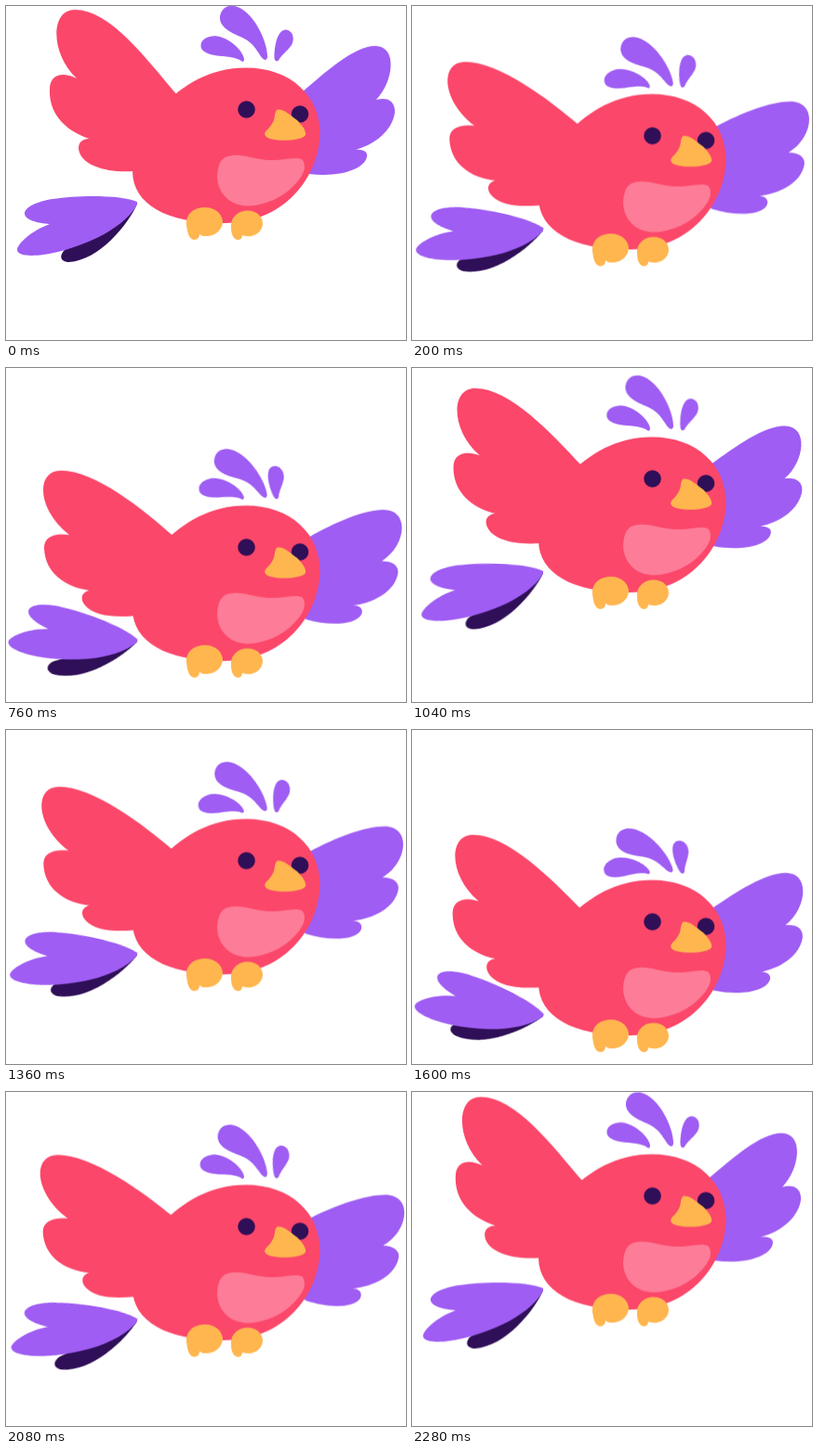
These frames come from a looping animation (430x360 px, 2320 ms). An HTML page:

```html
<!DOCTYPE html>
<html lang="en">
<head>
<meta charset="utf-8">
<title>Flying bird</title>
<style>
  html, body { margin: 0; width: 100%; height: 100%; overflow: hidden; background: #fff; }
  svg { display: block; width: 430px; height: 360px; }

  .red { fill: #fb476a; }
  .purple { fill: #9f5df3; }
  .dark { fill: #2f0f57; }
  .orange { fill: #ffb64f; }
  .pink { fill: #fd7c97; }

  /* all parts share one start and one easing; wings beat twice per bob */
  .bird, .wing, .part { animation: 1160ms ease-in-out -8ms infinite; }
  .bird { animation-name: bob; animation-duration: 2320ms; }
  .wing { animation-duration: 580ms; }
  .left { animation-name: flap-left; }
  .right { animation-name: flap-right; }

  .tail { animation-name: tail; transform-origin: 141px 213px; }
  .under { animation-name: under; transform-origin: 141px 213px; }
  .crest-a { animation-name: crest-a; transform-origin: 255px 59px; }
  .crest-b { animation-name: crest-b; transform-origin: 279px 57px; }
  .crest-c { animation-name: crest-c; transform-origin: 291px 58px; }

  @keyframes bob {
    0%, 50%, 100% { transform: translateY(0); }
    25%, 74.6% { transform: translateY(105px); }
  }
  @keyframes tail { 37%, 52% { transform: rotate(26deg); } }
  @keyframes under { 37%, 45% { transform: rotate(28deg); } }
  @keyframes crest-a { 29% { transform: rotate(-19deg); } }
  @keyframes crest-b { 36% { transform: rotate(-15.5deg); } }
  @keyframes crest-c { 50% { transform: rotate(-32deg); } }

  @keyframes flap-left {
    50% {
      d: path("M179 101 C146.5 75 90 37 54 37 C26 37 28.5 78 65.5 105 C48.5 104 39 109.5 39 119.5 C40 146 62.5 161 89.5 163 C81 165.5 80.5 174 87 179.5 C97 189 115 190 137 188 L200 170 Z");
    }
  }
  @keyframes flap-right {
    50% {
      d: path("M328.5 103 C355.5 90 388 80.5 408.5 80.5 C439.5 80.5 434.5 120 406 135 C417 135.5 424 141 422.5 148 C418.5 168 395 178.5 372.5 180.5 C380.5 181 383 186.5 380 191.5 C372 202 344 200.5 321.5 192 L290 160 L300 115 Z");
    }
  }
</style>
</head>
<body>
<svg viewBox="0 0 430 360">
  <g class="bird">
    <path class="part under dark" d="M141 213 C132 235 100 274 68 276 C58 276 57 269 63 263 L95 240 Z"/>
    <path class="part tail purple" d="M141 211 C128 204 80 203 50 208 C32 211 20 217 20 224 C21 231 34 234 47 235 C28 242 12 256 12 263 C13 269 25 270 40 268 C75 263 125 243 141 214 Z"/>

    <path class="wing right purple" d="M318 93 C344 71 374 43 397 43 C421 43 417 81 398 101 C410 98 418 102 418 114 C416 134 396 150 375 155 C384 154 389 157 388 162 C386 176 358 185 326 181 L290 150 L300 108 Z"/>
    <path class="wing left red" d="M184 96 C150 56 112 4 74 4 C47 4 48 52 76 78 C60 70 47 74 47 90 C46 117 65 135 89.5 143 C80 143 76 150 79 158 C84 172 108 180 137 178 L200 165 Z"/>

    <path class="part crest-a purple" d="M254 60 C247 54 236 55 224 53 C213 51 209 47 209.5 42 C210 35 219 31.5 227 32.5 C242 35 255 49 256 57 Q256 60 254 60 Z"/>
    <path class="part crest-b purple" d="M278.5 58 C272 56 270 41 254 34 C240 28 229 22 230 11 C232 1 239 -1 246 0 C266 5 281 38 281 54 Q281 58 278.5 58 Z"/>
    <path class="part crest-c purple" d="M291 59.5 Q288.5 59 288.5 55 C288.5 42 292 25.5 301 25.5 C309 26.5 310.5 36 307 42 C302 49 295 54 294 57 Q292 60 291 59.5 Z"/>

    <path class="red" d="M258 66.5 C306 66.5 338 97 337.5 138 C336 186 298 234 235 234 C176 235 136 215 136 178 C136 140 182 66.5 258 66.5 Z"/>
    <path class="pink" d="M243 161 C257 159 270 167 290 166 C304 165 314 162 319 166 C324 174 319 184 310 193 C298 206 279 215 260 215.5 C238 215 227 199 227 183 C228 170 231 162 243 161 Z"/>

    <circle class="dark" cx="258.5" cy="111.5" r="9.3"/>
    <circle class="dark" cx="316" cy="116.5" r="9.3"/>
    <path class="orange" d="M292 111.5 C299 111 306 118 313 123 C319 129 323 135 322 139 C319 146 283 147 279 140 C275 134 288 132 289 117 Q290 112 292 111.5 Z"/>

    <path class="orange" d="M194 236 C193 224 202 217 214 217 C226 217 233 225 233 233 C232 243 223 249 213 248 C210 248 209 246 208 246 C208 249 206 252 202 252 C196 251 195 243 194 236 Z"/>
    <path class="orange" d="M242 239 C241 228 249 220.5 260 220.5 C270 220.5 276 227 276 235 C275 244 267 249 258 248 C256 248 255 247 254 247 C254 250 252 252 249 252 C244 251 242 245 242 239 Z"/>
  </g>
</svg>
</body>
</html>
```
